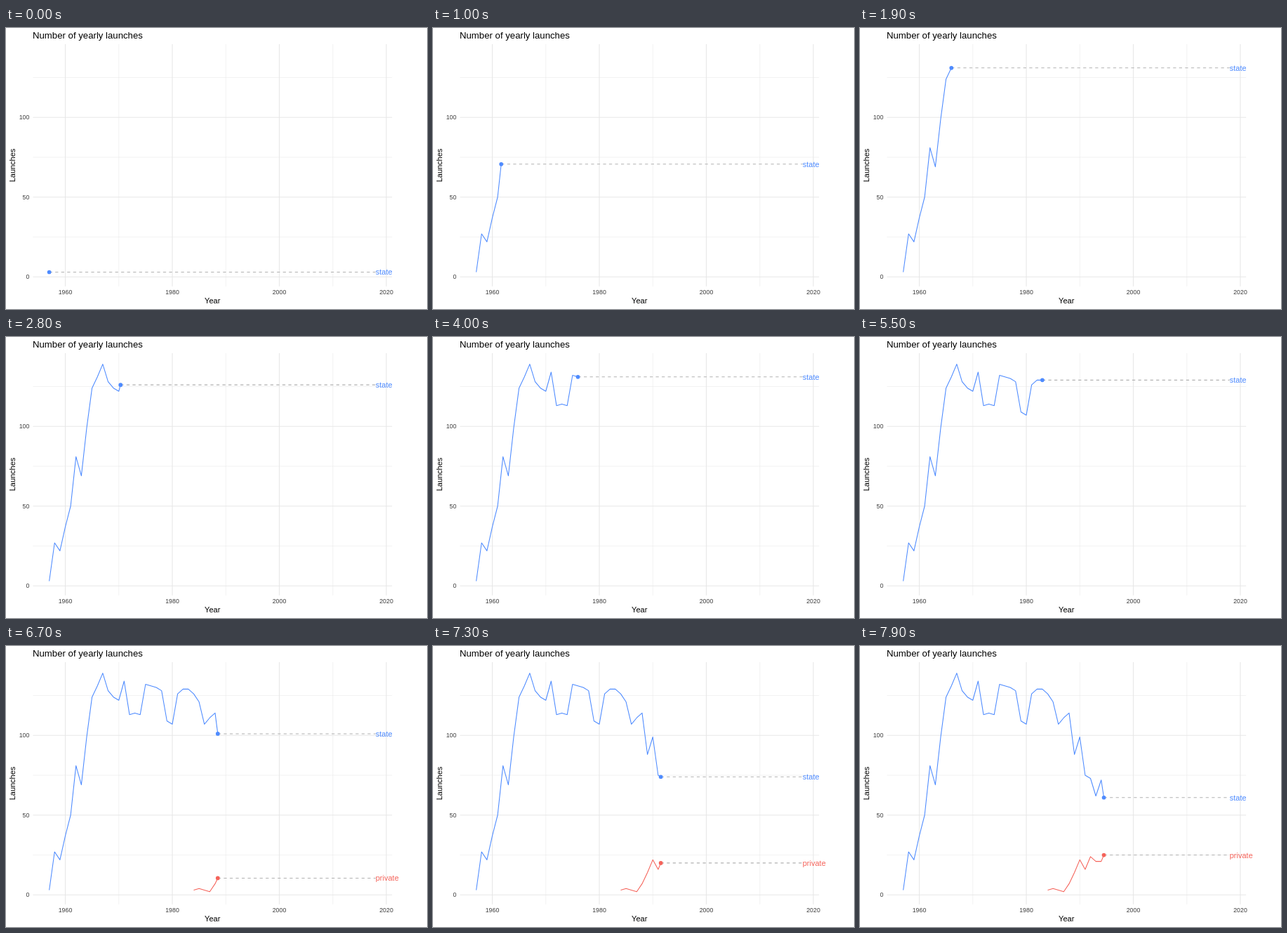
Animation of 600x400 px, one loop 8 s. Source, as an HTML page:

```html
<!DOCTYPE html>
<html lang="en">
<head>
<meta charset="utf-8">
<title>Number of yearly launches</title>
<style>
html, body { margin: 0; width: 100%; height: 100%; overflow: hidden; background: #fff; }
svg { display: block; width: 600px; height: 400px; font-family: "Liberation Sans", Arial, sans-serif; }
.grid { stroke: #e7e7e7; fill: none; }
.tick { font-size: 8.8px; fill: #3b3b3b; }
.name { font-size: 11px; }
.title { font-size: 13.2px; }
.dash { stroke: #b2b2b2; stroke-width: 1.07; stroke-dasharray: 4.27 4.27; }
.line { fill: none; stroke-width: 1.07; stroke-linejoin: round; }
</style>
</head>
<body>
<svg id="chart" viewBox="0 0 600 400"></svg>
<script>
const LOOP = 8000, STEP = 100;
const FIRST = 1957, LAST = 2018, STEPS = 129;
const PANEL = { left: 38.4, right: 550.2, top: 23, bottom: 367.7 };

const series = [
  { name: 'private', color: '#f5635a', start: 1984,
    values: [3, 4, 3, 2, 7, 14, 22, 16, 24, 21, 21, 29] },
  { name: 'state', color: '#4e8bff', start: 1957,
    values: [3, 27, 22, 37, 50, 81, 69, 99, 124, 131, 139, 128, 124, 122, 134, 113, 114, 113,
      132, 131, 130, 128, 109, 107, 126, 129, 129, 126, 121, 107, 111, 114, 88, 99, 75, 73, 62, 72, 50] }
];

const chart = document.getElementById('chart');
const xOf = year => 84.5 + (year - 1960) * 7.625;
const yOf = value => 354.3 - value * 2.271;

function add(tag, attrs, text) {
  const el = document.createElementNS('http://www.w3.org/2000/svg', tag);
  set(el, attrs);
  if (text !== undefined) el.textContent = text;
  return chart.appendChild(el);
}
function set(el, attrs) {
  for (const key in attrs) el.setAttribute(key, attrs[key]);
}

function drawAxes() {
  const { left, right, top, bottom } = PANEL;
  const row = (v, w) => add('path', { class: 'grid', 'stroke-width': w, d: `M${left} ${yOf(v)}H${right}` });
  const column = (v, w) => add('path', { class: 'grid', 'stroke-width': w, d: `M${xOf(v)} ${top}V${bottom}` });
  [25, 75, 125].forEach(v => row(v, 0.53));
  [1970, 1990, 2010].forEach(v => column(v, 0.53));
  [0, 50, 100].forEach(v => {
    row(v, 1.07);
    add('text', { class: 'tick', x: 33.4, y: yOf(v) + 3.15, 'text-anchor': 'end' }, v);
  });
  [1960, 1980, 2000, 2020].forEach(v => {
    column(v, 1.07);
    add('text', { class: 'tick', x: xOf(v), y: 379.1, 'text-anchor': 'middle' }, v);
  });
  add('text', { class: 'title', x: 38, y: 15 }, 'Number of yearly launches');
  add('text', { class: 'name', x: 294.2, y: 392, 'text-anchor': 'middle' }, 'Year');
  add('text', { class: 'name', transform: 'translate(13.4 195.5) rotate(-90)', 'text-anchor': 'middle' }, 'Launches');
}

// Each year lands on a whole step; steps between are linear.
const stepOf = year => Math.round((year - FIRST) * STEPS / (LAST - FIRST));
function yearAt(step) {
  let year = FIRST;
  while (stepOf(year + 1) <= step) year++;
  return year + (step - stepOf(year)) / (stepOf(year + 1) - stepOf(year));
}

function build() {
  series.forEach(s => s.line = add('polyline', { class: 'line', stroke: s.color }));
  series.forEach(s => s.dash = add('line', { class: 'dash', x2: xOf(LAST) }));
  series.forEach(s => s.dot = add('circle', { r: 2.85, fill: s.color }));
  series.forEach(s => s.label = add('text', { class: 'name', x: xOf(LAST), fill: s.color }, s.name));
}

function update(s, year) {
  const shown = year >= s.start;
  [s.line, s.dash, s.dot, s.label].forEach(el => set(el, { visibility: shown ? 'visible' : 'hidden' }));
  if (!shown) return;
  const pos = year - s.start, i = Math.floor(pos);
  const from = s.values[i], to = s.values[i + 1] ?? from;
  const x = xOf(year), y = yOf(from + (to - from) * (pos - i));
  const points = s.values.slice(0, i + 1).map((v, k) => `${xOf(s.start + k)},${yOf(v)}`);
  set(s.line, { points: [...points, `${x},${y}`].join(' ') });
  set(s.dash, { x1: x, y1: y, y2: y });
  set(s.dot, { cx: x, cy: y });
  set(s.label, { y: y + 4 });
}

drawAxes();
build();
const begin = performance.now();
let last = -1;
function frame() {
  const step = Math.floor((performance.now() - begin) % LOOP / STEP);
  if (step !== last) {
    const year = yearAt(step);
    series.forEach(s => update(s, year));
    last = step;
  }
  requestAnimationFrame(frame);
}
frame();
</script>
</body>
</html>
```
